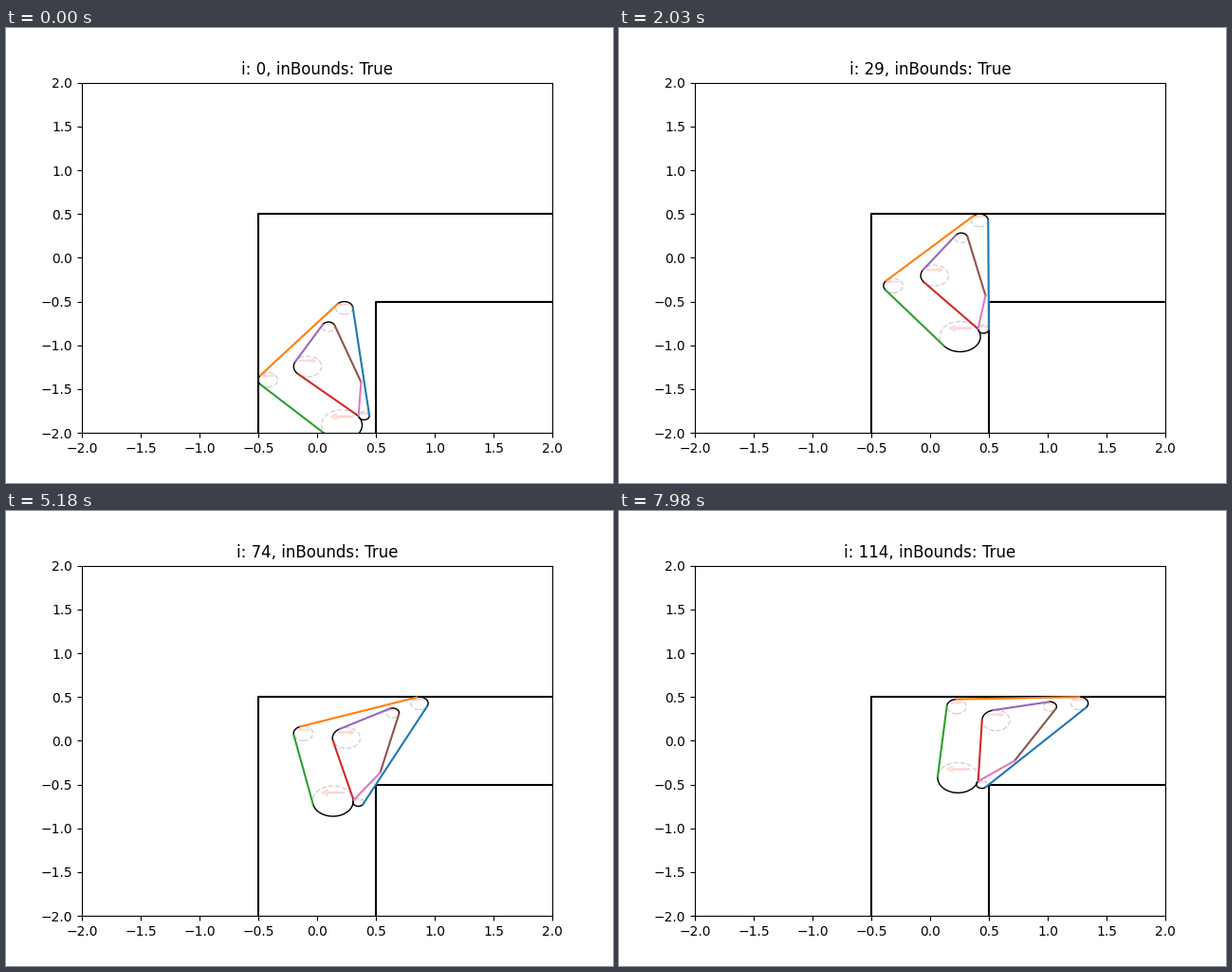
A matplotlib script that plays this animation: 640x480 px, repeating every 8000 ms.

```python
import numpy as np
import matplotlib.pyplot as plt
from matplotlib.animation import FuncAnimation
from matplotlib.patches import Circle, FancyArrow

FRAMES = 115
LOOP_MS = 8000
RISE = 10            # frames spent moving up the corridor
STEP = 0.01          # slide along the top wall per frame

# Belt pulleys: offset from the top pulley, radius, turn (+1 ccw, -1 cw)
BELT = [
    (0.1676 - 1.2317j, 0.046, 1),
    (0, 0.073, 1),
    (-0.649 - 0.821j, 0.0825, 1),
    (-0.021 - 1.337j, 0.173, 1),
    (-0.312 - 0.668j, 0.118, -1),
    (-0.134 - 0.215j, 0.055, -1),
    (0.143 - 0.847j, 0.0, -1),
]
N = len(BELT)
FOOT, R_FOOT, _ = BELT[0]
R_TOP = BELT[1][1]
SPAN = abs(FOOT)
REST = np.arctan2(-FOOT.real, -FOOT.imag)
REST_X = 0.231
CORNER = 0.5 - 0.5j


def pose(i):
    """Position of the top pulley and clockwise turn of the body."""
    top = REST_X + 1j * (0.5 - R_TOP)
    if i < RISE:
        return top + 1j * (i * 0.0988 - 1), 0.0
    top += STEP * (i - RISE)
    # smallest turn that clears the inner wall and the inner corner
    wall = np.arcsin((top.real + R_FOOT - 0.5) / SPAN)
    gap = top - CORNER
    edge = (np.arctan2(gap.real, gap.imag) + np.arcsin(R_TOP / abs(gap))
            - np.arcsin((R_TOP - R_FOOT) / SPAN))
    return top, max(REST, wall, edge) - REST


def tangent(c1, q1, c2, q2):
    """Unit normal on the right of the line touching two signed circles."""
    d = c2 - c1
    return np.exp(1j * (np.angle(d) - np.arccos((q1 - q2) / abs(d))))


def arc(c, r, turn, n_in, n_out):
    sweep = turn * (np.angle(n_out / n_in) * turn % (2 * np.pi))
    a = np.angle(turn * n_in) + np.linspace(0, sweep, 50)
    return c + r * np.exp(1j * a)


def put(line, pts):
    pts = np.asarray(pts)
    line.set_data(pts.real, pts.imag)


fig, ax = plt.subplots(figsize=(6.4, 4.8), dpi=100)
ax.set_xlim(-2, 2)
ax.set_ylim(-2, 2)
title = ax.set_title("")
ax.plot([-0.5, -0.5, 2], [-2, 0.5, 0.5], "k", lw=1.5)
ax.plot([0.5, 0.5, 2], [-2, -0.5, -0.5], "k", lw=1.5)

rings, arrows = [], []
for _, r, turn in BELT:
    ring = Circle((0, 0), r, fill=False, ec="lightgray", ls="--", lw=1)
    arrow = FancyArrow(0, 0, -turn * max(r, 0.01), 0, width=0.1 * r,
                       head_width=0.4 * r, head_length=0.3 * r,
                       length_includes_head=True, color="red", alpha=0.1)
    if r:
        rings.append(ax.add_patch(ring))
        arrows.append(ax.add_patch(arrow))
    else:
        rings.append(None)
        arrows.append(None)
arcs = [ax.plot([], [], "k", lw=1)[0] for _ in BELT]
sides = [ax.plot([], [], color=f"C{k}", lw=1.5)[0] for k in range(N)]


def draw(i):
    top, angle = pose(i)
    spin = np.exp(-1j * angle)
    c = [top + p * spin for p, _, _ in BELT]
    q = [r * turn for _, r, turn in BELT]
    normals = []
    for k in range(N):
        m = (k + 1) % N
        n = tangent(c[k], q[k], c[m], q[m])
        normals.append(n)
        put(sides[k], [c[k] + q[k] * n, c[m] + q[m] * n])
    for k, (_, r, turn) in enumerate(BELT):
        if not r:
            continue
        put(arcs[k], arc(c[k], r, turn, normals[k - 1], normals[k]))
        rings[k].center = c[k].real, c[k].imag
        half = turn * (r + 0.02) / 2
        arrows[k].set_data(x=c[k].real + half, y=c[k].imag + 0.56 * r,
                           dx=-2 * half, dy=0)
    title.set_text(f"i: {i}, inBounds: True")
    return []


anim = FuncAnimation(fig, draw, frames=FRAMES, interval=LOOP_MS / FRAMES,
                     repeat=True, repeat_delay=0)
plt.show()
```
